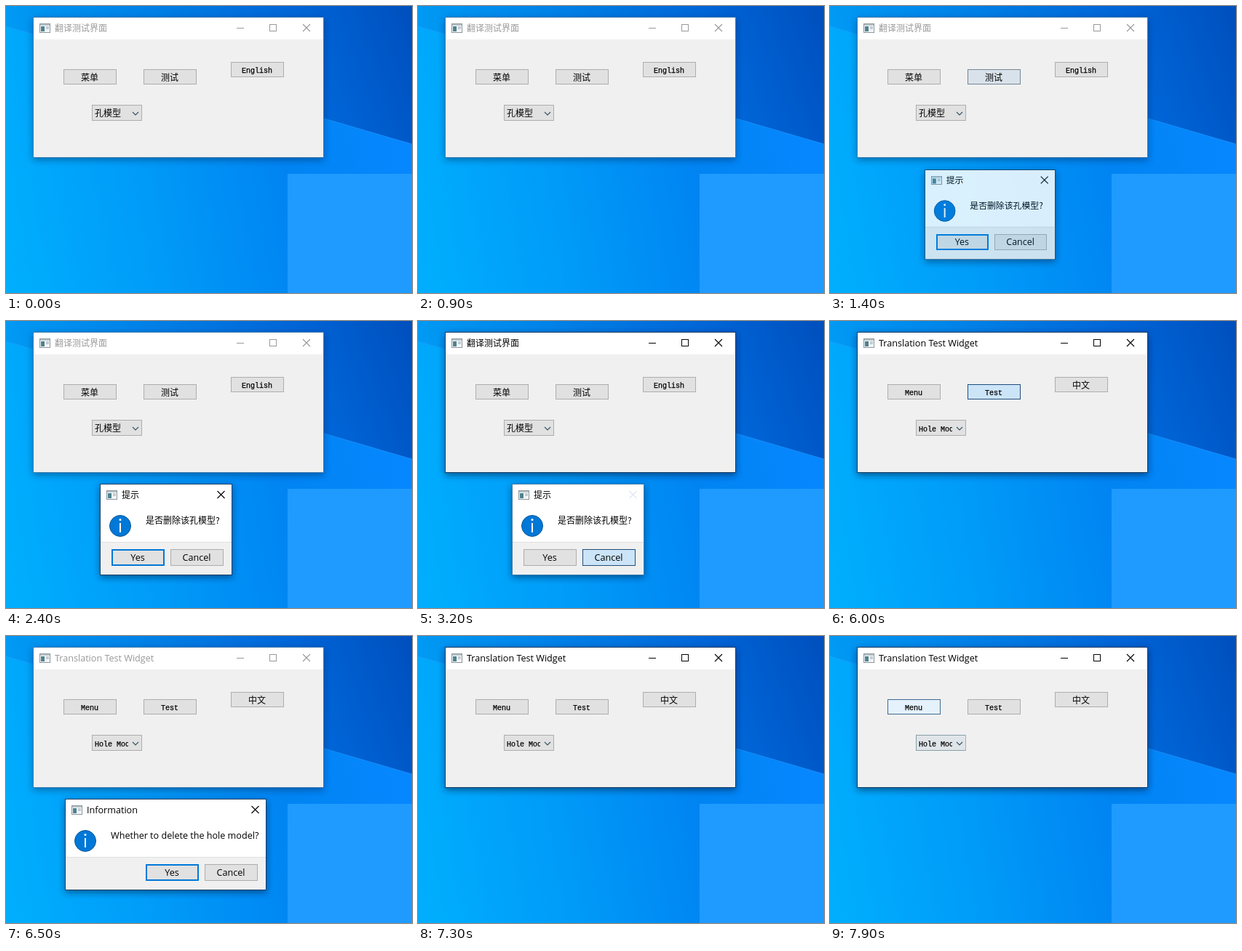
Write an HTML page that moves like this. It is 558 px wide and 395 px high and loops after 8000 ms.

```html
<!DOCTYPE html>
<html lang="zh-CN">
<head>
<meta charset="utf-8">
<title>Translation Test Widget</title>
<style>
html, body { margin: 0; width: 100%; height: 100%; overflow: hidden; background: #008cf2; }
svg { display: block; width: 558px; height: 395px; }
text { white-space: pre; }
.ui { font: 12.6px "Open Sans", "Noto Sans", sans-serif; }
.zh { font: 12px "Noto Sans CJK SC", "Noto Sans CJK", "Noto Sans CJK JP", sans-serif; }
.mono { font: 10px "Liberation Mono", "DejaVu Sans Mono", monospace; stroke: #000; stroke-width: .25; }
.crisp { shape-rendering: crispEdges; }
</style>
</head>
<body>
<svg viewBox="0 0 558 395" xmlns="http://www.w3.org/2000/svg">
  <defs>
    <linearGradient id="sky" gradientUnits="userSpaceOnUse" x1="0" y1="200" x2="558" y2="0">
      <stop offset="0" stop-color="#00a2f8"/><stop offset=".4" stop-color="#0082e8"/>
      <stop offset=".75" stop-color="#0064d6"/><stop offset="1" stop-color="#004fbd"/>
    </linearGradient>
    <linearGradient id="beam" gradientUnits="userSpaceOnUse" x1="0" y1="330" x2="558" y2="230">
      <stop offset="0" stop-color="#00aefd"/><stop offset=".35" stop-color="#009bf8"/>
      <stop offset=".7" stop-color="#0084f2"/><stop offset="1" stop-color="#0787ff"/>
    </linearGradient>
    <filter id="blur" x="-20%" y="-20%" width="140%" height="150%"><feGaussianBlur stdDeviation="5"/></filter>
  </defs>
  <rect width="558" height="395" fill="url(#sky)"/>
  <path d="M0 28L558 190V395H0Z" fill="url(#beam)"/>
  <path d="M0 28L558 190" stroke="#2a9dff" stroke-opacity=".55"/>
  <rect x="387" y="231" width="171" height="171" fill="#1f9bff"/>
  <g id="scene"></g>
</svg>
<script>
const LOOP = 8000, TICK = 100;
const scene = document.getElementById('scene');
const GREY = ['#e1e1e1', '#adadad'];
const HOVER = ['#e5f1fb', '#3f6a92'];
const PRESSED = ['#cce4f7', '#1f4e7c'];

const WORDS = {
  zh: { title: '翻译测试界面', menu: '菜单', test: '测试', lang: 'English', combo: '孔模型',
        head: '提示', ask: '是否删除该孔模型?', x: 129, w: 182 },
  en: { title: 'Translation Test Widget', menu: 'Menu', test: 'Test', lang: '中文', combo: 'Hole Model',
        head: 'Information', ask: 'Whether to delete the hole model?', x: 81, w: 277 }
};

const clamp = v => Math.max(0, Math.min(1, v));
const within = (t, a, b) => t >= a && t < b;
const channels = c => [1, 3, 5].map(i => parseInt(c.slice(i, i + 2), 16));

function mix(a, b, k) {
  const to = channels(b);
  return `rgb(${channels(a).map((v, i) => Math.round(v + (to[i] - v) * k))})`;
}

// Button colours for a pointer that enters, presses, and leaves.
function look(t, enter, press, leave) {
  const level = t < leave ? clamp((t - enter + 100) / 200) : clamp(1 - (t - leave + 50) / 250);
  const goal = t >= press ? PRESSED : HOVER;
  return GREY.map((c, i) => mix(c, goal[i], level));
}

const box = (x, y, w, h, fill, stroke, width = 1) =>
  `<rect class="crisp" x="${x + width / 2}" y="${y + width / 2}" width="${w - width}" height="${h - width}" fill="${fill}" stroke="${stroke}" stroke-width="${width}"/>`;

const fill = (x, y, w, h, color) =>
  `<rect x="${x}" y="${y}" width="${w}" height="${h}" fill="${color}"/>`;

function label(s, x, y, { font = 'ui', color = '#000', anchor = 'start', extra = '' } = {}) {
  if (/[\u4e00-\u9fff]/.test(s)) font = 'zh';
  return `<text class="${font}" x="${x}" y="${y}" fill="${color}" text-anchor="${anchor}" ${extra}>${s}</text>`;
}

function button(s, x, y, [face, edge], { h = 21, font = 'mono', width = 1 } = {}) {
  const base = y + (font === 'ui' || /[\u4e00-\u9fff]/.test(s) ? 15.5 : 14.5);
  return box(x, y, 73, h, face, edge, width) +
    label(s, x + 36, base, { font, anchor: 'middle' });
}

const cross = (x, y, color) =>
  `<path d="M${x - 5} ${y - 5}l10 10m0 -10l-10 10" stroke="${color}" stroke-width="1.1"/>`;

const appIcon = (x, y) =>
  box(x, y, 15, 13, '#f4f6f7', '#8b969c') + fill(x + 1, y + 1, 13, 2, '#b9c4ca') +
  fill(x + 2, y + 4, 5, 7, '#4d8290') + fill(x + 9, y + 4, 4, 4, '#c5cdd1');

const shadow = (x, y, w, h, alpha) =>
  `<rect x="${x}" y="${y + 3}" width="${w}" height="${h}" fill="#001c40" opacity="${alpha}" filter="url(#blur)"/>`;

function mainWindow(t, words, active) {
  const ink = active ? '#000' : '#999';
  const menu = look(t, 7800, LOOP, LOOP);
  const test = t < 3000 ? look(t, 1000, 1200, 1300) : look(t, 5700, 6000, 6100);
  const lang = look(t, 4600, 4800, 4900);
  const over = within(t, 7700, 7800) ? 1 : t >= 7800 ? .5 : 0;
  return shadow(37, 15, 400, 194, active ? .6 : .42) +
    box(37, 15, 400, 194, '#f0f0f0', active ? '#173f66' : '#3f7daf') +
    fill(38, 16, 398, 30, '#fff') + appIcon(46, 24) +
    label(words.title, 67, 35, { color: ink }) +
    `<path class="crisp" d="M317 30.5h10M362.5 25.5h9v9h-9z" fill="none" stroke="${ink}"/>` +
    cross(413, 30, ink) +
    button(words.menu, 79, 87, menu) +
    button(words.test, 189, 87, test) +
    button(words.lang, 309, 77, lang) +
    box(118, 136, 69, 22, mix('#e1e1e1', '#dce9f0', over), mix('#adadad', '#66909c', over)) +
    label(words.combo, 122, 151.5, { font: 'mono', extra: 'clip-path="inset(0 0 0 0)" visibility="visible"' }) +
    fill(168, 138, 18, 18, mix('#e1e1e1', '#dce9f0', over)) +
    (words === WORDS.en ? fill(187, 137, 3, 20, '#f0f0f0') + box(186, 136, 1, 22, '#adadad', 'none', 0) : '') +
    `<path d="M174 146l4 4 4 -4" fill="none" stroke="#32515f" stroke-width="1.1"/>`;
}

function dialog(t, words, shown, leaving, cancel) {
  const { x, w } = words, mid = x + w / 2, size = .93 + .07 * shown;
  const done = t >= leaving;
  const yes = done ? GREY : ['#e1e1e1', '#0078d7'];
  return `<g opacity="${shown}" transform="translate(${mid} 287) scale(${size}) translate(${-mid} -287)">` +
    shadow(x, 224, w, 126, .55) +
    box(x, 224, w, 126, '#fff', done ? '#3f7daf' : '#173f66') +
    fill(x + 1, 304, w - 2, 45, '#f0f0f0') + fill(x + 1, 304, w - 2, 1, '#dfdfdf') +
    appIcon(x + 9, 233) + label(words.head, x + 30, 244) +
    cross(x + w - 15.5, 239, done ? '#dce6f2' : '#000') +
    `<circle cx="${x + 28}" cy="282" r="14.5" fill="#0078d7" stroke="#075497"/>` +
    `<path d="M${x + 28} 278v13" stroke="#fff" stroke-width="2"/><circle cx="${x + 28}" cy="273.5" r="1.5" fill="#fff"/>` +
    label(words.ask, x + 63, 279) +
    button('Yes', x + w - 166, 314, yes, { h: 23, font: 'ui', width: done ? 1 : 2 }) +
    button('Cancel', x + w - 85, 314, cancel, { h: 23, font: 'ui' }) + '</g>';
}

// Opacity of a dialog that fades in after open and out after close.
function presence(t, open, close) {
  if (t <= open || t >= close + 200) return 0;
  if (t > close) return .4;
  return t - open < 200 ? .85 : 1;
}

function draw(t) {
  const words = t < 4900 ? WORDS.zh : WORDS.en;
  const active = within(t, 1200, 1300) || within(t, 3200, 3500) || within(t, 4800, 6100) || t >= 7100;
  const [open, close] = words === WORDS.zh ? [1300, 3200] : [6100, 7100];
  const shown = presence(t, open, close);
  const cancel = look(t, close - 400, close - 100, close + 200);
  scene.innerHTML = mainWindow(t, words, active) +
    (shown ? dialog(t, words, shown, close, cancel) : '');
}

let last = -1;
const start = performance.now();
function frame() {
  const t = Math.floor((performance.now() - start) % LOOP / TICK) * TICK;
  if (t !== last) draw(last = t);
  requestAnimationFrame(frame);
}
draw(0);
frame();
</script>
</body>
</html>
```
